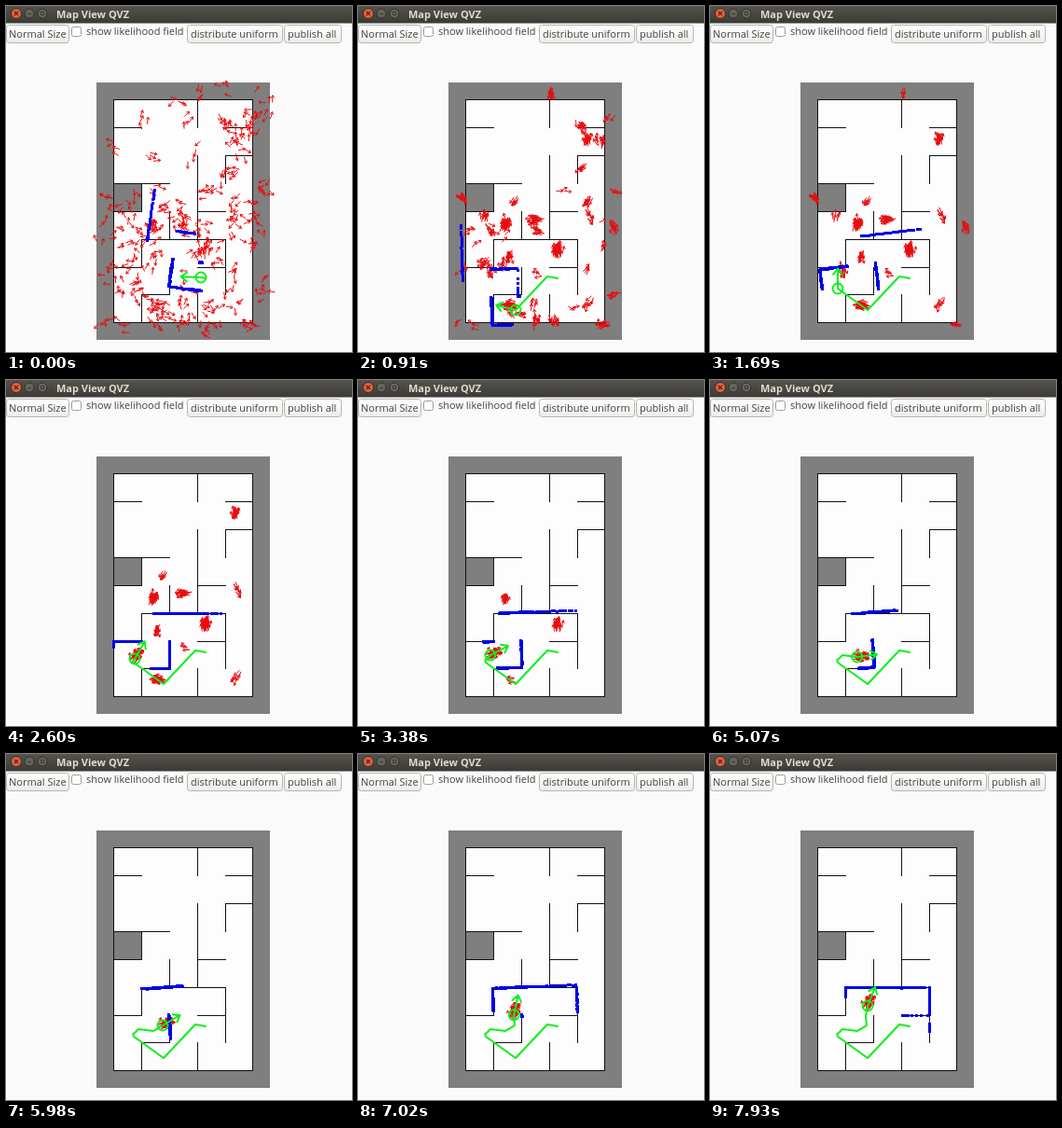
An HTML page with a canvas that plays this animation: 371x371 px, repeating every 8000 ms.

```html
<!DOCTYPE html>
<html lang="en">
<head>
<meta charset="utf-8">
<title>Map View</title>
<style>
  html, body { margin: 0; width: 100%; height: 100%; overflow: hidden; background: #fafafa; }
  svg, canvas { position: absolute; left: 0; top: 0; width: 371px; height: 371px; }
  text { font: 11px "Open Sans", "Noto Sans", sans-serif; fill: #45433f; }
  .title { font-weight: bold; fill: #dfdbd2; }
  .button { fill: url(#face); stroke: #b8b4ae; }
</style>
</head>
<body>
<svg viewBox="0 0 371 371">
  <defs>
    <linearGradient id="bar" x2="0" y2="1"><stop stop-color="#55534c"/><stop offset="1" stop-color="#3b3a36"/></linearGradient>
    <linearGradient id="face" x2="0" y2="1"><stop stop-color="#fff"/><stop offset="1" stop-color="#ececea"/></linearGradient>
  </defs>
  <rect width="371" height="18.500" fill="url(#bar)"/>
  <circle cx="11" cy="8" r="5.5" fill="#e9603a" stroke="#33322e"/>
  <path d="M9 6l4 4m0-4l-4 4" stroke="#4a2a1c" stroke-width="1.2"/>
  <g fill="#65635c" stroke="#33322e"><circle cx="25" cy="8" r="5"/><circle cx="39" cy="8" r="5"/></g>
  <path d="M23 8.500h4M37.500 6.500h3v3h-3z" fill="none" stroke="#3b3a36"/>
  <text class="title" x="54" y="12.5">Map View QVZ</text>
  <rect class="button" x=".5" y="20.5" width="67" height="19" rx="3"/>
  <rect class="button" x="194.5" y="20.5" width="102" height="19" rx="3"/>
  <rect class="button" x="298.5" y="20.5" width="61" height="19" rx="3"/>
  <rect x="70.5" y="22.5" width="10" height="10" rx="2" fill="#fff" stroke="#a09c96"/>
  <text x="3" y="33.5">Normal Size</text>
  <text x="86" y="31">show likelihood field</text>
  <text x="198" y="33.5">distribute uniform</text>
  <text x="302" y="33.5">publish all</text>
</svg>
<canvas id="view" width="371" height="371"></canvas>
<script>
const ctx = document.getElementById('view').getContext('2d');
const PERIOD = 8000, STEP = 130, RAD = Math.PI / 180;

// The floor plan in grid cells: x1, y1, x2, y2
const column = i => Math.floor(115.4 + 29.9 * i), row = j => Math.floor(100.6 + 29.9 * j);
const walls = [
  [0, 0, 5, 0], [5, 0, 5, 8], [5, 8, 0, 8], [0, 8, 0, 0],
  [0, 1, 1, 1], [3, 0, 3, 1], [4, 1, 5, 1], [4, 2, 5, 2], [4, 2, 4, 3], [3, 2, 3, 5],
  [0, 3, 2, 3], [1, 3, 1, 4], [0, 4, 1, 4], [3, 4, 4, 4], [2, 4, 2, 5], [1, 5, 4, 5],
  [1, 5, 1, 6], [0, 6, 1, 6], [4, 5, 4, 7], [3, 6, 4, 6], [2, 6, 2, 7], [1, 7, 2, 7],
  [1, 7, 1, 8], [3, 7, 3, 8]
].map(([a, b, c, d]) => [column(a), row(b), column(c), row(d)]);

// Where the robot really is: time, x, y, heading in degrees
const track = [
  [0, 129, 313, 264], [910, 130, 306, 286], [1690, 132, 303, 277], [2600, 138, 299, 300],
  [3400, 142, 295, 335], [4160, 150, 296, 368], [5100, 158, 297, 357], [5980, 168, 291, 334],
  [6900, 167, 281, 283], [7930, 169, 270, 292]
];
// Wrong first estimates: until time, x, y, heading error
const guesses = [[130, 209, 291, -82], [520, 203, 290, -82], [1170, 169, 326, -92], [2340, 137, 303, -7]];

// Poses that survive longest: x, y, heading, particle count
const survivors = [
  [246, 142, 280, 22], [158, 234, 285, 42], [191, 228, 180, 22], [214, 262, 270, 48], [163, 321, 190, 36],
  [162, 268, 95, 14], [249, 225, 60, 8], [246, 320, 130, 8], [191, 287, 200, 4], [169, 209, 130, 6]
];

function random(seed) {
  return () => {
    seed = seed + 0x6D2B79F5 | 0;
    let r = Math.imul(seed ^ seed >>> 15, 1 | seed);
    r = r + Math.imul(r ^ r >>> 7, 61 | r) ^ r;
    return ((r ^ r >>> 14) >>> 0) / 4294967296;
  };
}
const bell = rnd => Math.sqrt(-2 * Math.log(1 - rnd())) * Math.cos(2 * Math.PI * rnd());
const clamp = v => Math.max(0, Math.min(1, v));

// Chance poses: sparse in the upper rooms, dying out exponentially
const rnd = random(23);
const hypotheses = survivors.map(([x, y, heading, count]) =>
  ({ x, y, angle: heading * RAD, count, life: 2900 + 15 * count }));
for (let i = 0; i < 85; i++) {
  let x, y;
  do {
    x = 104 + 172 * rnd();
    y = 88 + 264 * rnd();
  } while (x < 232 && y < 192 && rnd() < .85);
  hypotheses.push({ x, y, angle: 2 * Math.PI * rnd(), count: 11, life: 450 - 500 * Math.log(1 - rnd()) });
}

function truthAt(t) {
  const i = Math.max(1, track.findIndex(p => p[0] >= t));
  const a = track[i - 1], b = track[i], k = (t - a[0]) / (b[0] - a[0]);
  const [, x, y, heading] = a.map((v, j) => v + (b[j] - v) * k);
  return { x, y, angle: heading * RAD };
}

function estimateAt(t) {
  const truth = truthAt(t), guess = guesses.find(g => t < g[0]);
  if (guess) return { x: guess[1], y: guess[2], angle: truth.angle + guess[3] * RAD };
  const drift = .08 * Math.sin(Math.PI * clamp((t - 2600) / 5330));
  return { ...truth, angle: truth.angle - drift };
}

function arrow(x, y, angle, length, head) {
  const tipX = x + length * Math.cos(angle), tipY = y + length * Math.sin(angle);
  ctx.moveTo(x, y);
  ctx.lineTo(tipX, tipY);
  for (const a of [angle - 2.5, angle + 2.5]) {
    ctx.moveTo(tipX, tipY);
    ctx.lineTo(tipX + head * Math.cos(a), tipY + head * Math.sin(a));
  }
}

function drawMap() {
  ctx.fillStyle = '#7f7f7f';
  ctx.fillRect(97, 82, 186, 276);
  ctx.fillStyle = '#fdfdfd';
  ctx.fillRect(column(0), row(0), column(5) - column(0), row(8) - row(0));
  ctx.fillStyle = '#7f7f7f';
  ctx.fillRect(column(0), row(3), 30, 30);
  ctx.fillStyle = '#111';
  for (const [x1, y1, x2, y2] of walls)
    ctx.fillRect(Math.min(x1, x2), Math.min(y1, y2), Math.abs(x2 - x1) + 1, Math.abs(y2 - y1) + 1);
}

function cluster({ x, y, angle }, count, spread, turn, rnd, shake) {
  for (let i = 0; i < count; i++) {
    const along = 1.2 * spread * bell(rnd) - 3.5, across = .8 * spread * bell(rnd);
    const c = Math.cos(angle), s = Math.sin(angle);
    arrow(x + along * c - across * s + shake() - .5, y + along * s + across * c + shake() - .5,
      angle + turn * bell(rnd), 7, 2.6);
  }
}

function drawParticles(t, pose) {
  const shake = random(t + 5), early = Math.exp(-t / 450);
  ctx.beginPath();
  hypotheses.forEach((h, i) => {
    const share = clamp(.33 + t / 1300) * clamp((h.life - t) / 400);
    cluster(h, Math.round(h.count * share), 2 + 2.5 * early, .2 + .3 * early, random(i * 97 + 11), shake);
  });
  if (t > 1690) {
    const x = pose.x + 4 * Math.cos(pose.angle), y = pose.y + 4 * Math.sin(pose.angle);
    cluster({ x, y, angle: pose.angle }, Math.min(34, (t - 1690) / 26), 2.5, .25, random(71), shake);
  }
  ctx.strokeStyle = '#e80c10';
  ctx.lineWidth = 1;
  ctx.stroke();
}

function castRay({ x, y }, angle) {
  const c = Math.cos(angle), s = Math.sin(angle);
  return Math.min(...walls.map(([x1, y1, x2, y2]) => {
    const ex = x2 - x1, ey = y2 - y1, dx = x1 - x, dy = y1 - y, den = c * ey - s * ex;
    const d = (dx * ey - dy * ex) / den, u = (dx * s - dy * c) / den;
    return d > 0 && u >= -.01 && u <= 1.01 ? d : Infinity;
  }));
}

// The half-circle scan is measured from the true pose but shown at the estimate
function drawScan(t, pose) {
  const truth = truthAt(t), noise = random(t + 3);
  ctx.fillStyle = '#0000e4';
  for (let deg = -90; deg <= 90; deg++) {
    const d = castRay(truth, truth.angle + deg * RAD) + noise() - .5, a = pose.angle + deg * RAD;
    ctx.fillRect(Math.round(pose.x + d * Math.cos(a)) - 1, Math.round(pose.y + d * Math.sin(a)) - 1, 3, 3);
  }
}

function drawRobot(t, pose) {
  ctx.strokeStyle = '#0cf01c';
  ctx.lineWidth = 2;
  ctx.beginPath();
  ctx.moveTo(214, 292);
  for (let s = 0; s <= t; s += STEP) {
    const p = estimateAt(s);
    ctx.lineTo(p.x, p.y);
  }
  ctx.stroke();
  ctx.beginPath();
  ctx.arc(pose.x, pose.y, 5.5, 0, 7);
  arrow(pose.x, pose.y, pose.angle, 21.5, 8);
  ctx.stroke();
}

function frame(now) {
  const t = Math.floor(now % PERIOD / STEP) * STEP, pose = estimateAt(t);
  ctx.clearRect(0, 0, 371, 371);
  drawMap();
  drawParticles(t, pose);
  drawScan(t, pose);
  drawRobot(t, pose);
  requestAnimationFrame(frame);
}
ctx.lineCap = ctx.lineJoin = 'round';
frame(0);
</script>
</body>
</html>
```
